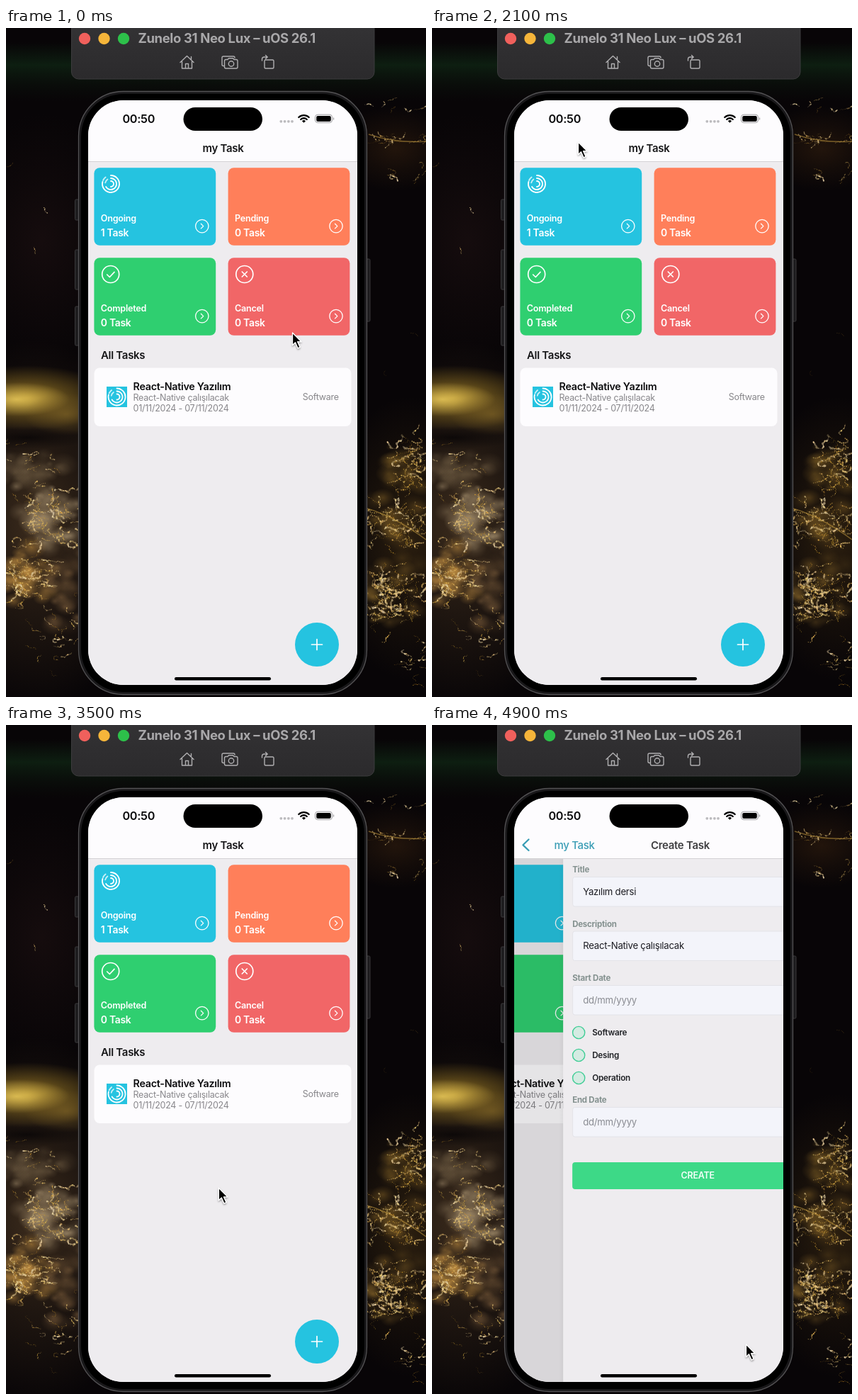
An HTML page with a canvas for the animation above (5 s loop, 593 by 944 pixels).

```html
<!DOCTYPE html>
<html lang="en">
<head>
<meta charset="utf-8">
<title>Task app demo</title>
<style>
html, body { margin: 0; width: 100%; height: 100%; overflow: hidden; background: #080507; }
canvas, svg { position: absolute; left: 0; top: 0; width: 593px; height: 944px; display: block; }
text { font-family: Inter, "Open Sans", sans-serif; letter-spacing: -.02em; white-space: pre; }
.line { fill: none; stroke-linecap: round; stroke-linejoin: round; }
.white { stroke: #fff; }
.nav { font-size: 15px; font-weight: 600; }
.name { font-size: 12.6px; font-weight: 600; fill: #fff; }
.count { font-size: 13.9px; font-weight: 600; fill: #fff; }
.sub { font-size: 12.5px; fill: #87868a; }
.label { font-size: 11.5px; font-weight: 700; fill: #84918f; }
.value { font-size: 13.2px; fill: #1c1c22; }
.hint { fill: #8a8c92; }
.option { font-size: 11.7px; font-weight: 600; fill: #202226; }
</style>
</head>
<body>
<canvas id="sky" width="593" height="944"></canvas>
<svg viewBox="0 0 593 944">
  <defs>
    <clipPath id="screen"><rect x="116" y="102" width="380" height="825" rx="50"/></clipPath>
    <linearGradient id="bar" x2="0" y2="1"><stop stop-color="#333234"/><stop offset="1" stop-color="#2b2a2c"/></linearGradient>
    <linearGradient id="edge"><stop stop-color="#000" stop-opacity="0"/><stop offset="1" stop-color="#000" stop-opacity=".04"/></linearGradient>
    <filter id="soft" x="-60%" y="-40%" width="240%" height="200%"><feDropShadow dx="0" dy="1.5" stdDeviation="1.3" flood-opacity=".4"/></filter>
    <g id="rings" class="line white">
      <path d="M0-12A12 12 0 1 1-11.6-3"/>
      <path d="M0-8A8 8 0 1 1-6.9 4"/>
      <path d="M0-4A4 4 0 0 1 0 4"/>
      <path d="M-11-5A12 12 0 0 1-7.4-9.5M-7.8-1.6A8 8 0 0 1-4.6-6.5" opacity=".75"/>
    </g>
    <g id="go" class="line white" stroke-width="1.3"><circle r="9.2"/><path d="M-1.5-3.3L1.9 0L-1.5 3.3"/></g>
  </defs>

  <!-- simulator toolbar -->
  <path d="M92.5 0V62a10 10 0 0 0 10 10H510a10 10 0 0 0 10-10V0Z" fill="url(#bar)" stroke="#3d3c3e"/>
  <circle cx="111" cy="15" r="8.2" fill="#f0605c"/>
  <circle cx="138.5" cy="15" r="8.2" fill="#f6b53a"/>
  <circle cx="166" cy="15" r="8.2" fill="#2dc04a"/>
  <text x="186.500" y="21" font-size="18.5" font-weight="700" fill="#a9a8aa">Zunelo 31 Neo Lux – uOS 26.1</text>
  <g class="line" stroke="#b0afb1" stroke-width="1.4">
    <path d="M246 48.5L255.5 39.5L265 48.5M248.5 47V57H262.5V47M253.5 57V50.5H257.5V57M261.5 44V40.5"/>
    <path d="M308 53.5H307a2 2 0 0 1-2-2V42a2 2 0 0 1 2-2H321a2 2 0 0 1 2 2"/>
    <path d="M310.5 44.5H313L314.5 42.8H320.5L322 44.5H325a2 2 0 0 1 2 2V55a2 2 0 0 1-2 2H310.5a2 2 0 0 1-2-2V46.5a2 2 0 0 1 2-2Z"/>
    <circle cx="318" cy="50.5" r="3.7"/>
    <rect x="365" y="45" width="13" height="12" rx="1.8"/>
    <path d="M361.5 46V44a3 3 0 0 1 3-3H369M366.5 38.5L369.2 41L366.5 43.5"/>
  </g>

  <!-- phone body -->
  <g fill="#1d1c1e" stroke="#3a393b">
    <rect x="97.5" y="242" width="6" height="29" rx="1.5"/>
    <rect x="97.5" y="313" width="6" height="56" rx="1.5"/>
    <rect x="97.5" y="393" width="6" height="55" rx="1.5"/>
    <rect x="508" y="326" width="6" height="88" rx="1.5"/>
  </g>
  <rect x="102.5" y="89.5" width="407" height="851" rx="63" fill="#19181a" stroke="#535254" stroke-width="1.3"/>
  <rect x="106" y="93" width="400" height="844" rx="60" fill="#000"/>

  <g clip-path="url(#screen)">
    <rect x="116" y="102" width="380" height="825" fill="#eeecef"/>
    <g id="home">
      <rect x="116" y="188" width="380" height="740" fill="#eeecef"/>
      <g id="cards"></g>
      <use href="#rings" x="148" y="220" stroke-width="1.9"/>
      <g class="line white" stroke-width="1.7">
        <circle cx="147.7" cy="347.5" r="12"/><path d="M142.7 348L146.3 351.5L153 344.3"/>
        <circle cx="336.8" cy="347.5" r="12"/><path d="M333.3 344L340.3 351M340.3 344L333.3 351"/>
      </g>
      <text x="134" y="466.5" font-size="15" font-weight="600" fill="#161618">All Tasks</text>
      <rect x="124.5" y="479.5" width="363" height="82.5" rx="8" fill="#fdfcfe"/>
      <rect x="142" y="506" width="29" height="29" fill="#25c3e0"/>
      <use href="#rings" x="156.5" y="520.5" stroke-width="1.8"/>
      <text x="179.5" y="510.8" font-size="14.35" font-weight="600" fill="#0c0c0e">React-Native Yazılım</text>
      <text class="sub" x="179.5" y="526.3">React-Native çalışılacak</text>
      <text class="sub" x="179.5" y="541.3">01/11/2024 - 07/11/2024</text>
      <text class="sub" x="469.8" y="525.3" text-anchor="end">Software</text>
      <g id="add">
        <circle cx="439" cy="870" r="31" fill="#25c3e0"/>
        <path class="line white" stroke-width="1.7" d="M431.5 870H446.5M439 862.5V877.5"/>
      </g>
    </g>
    <rect id="shade" x="116" y="188" width="380" height="740" opacity="0"/>
    <g id="form">
      <rect x="110" y="188" width="6" height="740" fill="url(#edge)"/>
      <rect x="116" y="188" width="380" height="740" fill="#eeecef"/>
      <g id="fields"></g>
      <rect x="129" y="617" width="354" height="38" rx="4" fill="#3dd987"/>
      <text x="306" y="640.3" text-anchor="middle" font-size="12.5" font-weight="600" fill="#f2fff8">CREATE</text>
    </g>

    <rect x="116" y="102" width="380" height="86" fill="#fdfcfe"/>
    <path d="M116 188.5H496" stroke="#d4d2d5"/>
    <text id="title" class="nav" x="277.5" y="174.5" fill="#161618">my Task</text>
    <g id="back" fill="#3a9db5">
      <path class="line" stroke="#3a9db5" stroke-width="2.3" d="M136.5 161.5L128.5 169.3L136.5 177"/>
      <text id="backText" class="nav" y="174.5" style="font-weight:500">my Task</text>
    </g>
    <text id="formTitle" class="nav" y="174.5" text-anchor="middle" fill="#161618">Create Task</text>

    <text x="164.5" y="134" font-size="16.2" font-weight="600" fill="#0a0a0c">00:50</text>
    <rect x="250.5" y="112" width="111.5" height="33" rx="16.5"/>
    <g fill="#bcbbbe"><circle cx="388.3" cy="131.8" r="1.9"/><circle cx="393.6" cy="131.8" r="1.9"/><circle cx="398.9" cy="131.8" r="1.9"/><circle cx="404" cy="131.8" r="1.9"/></g>
    <g class="line" stroke="#000" stroke-width="2.3" stroke-linecap="butt">
      <path d="M413.3 126A10.3 10.3 0 0 1 427.7 126M416.2 129A6.2 6.2 0 0 1 424.8 129"/>
    </g>
    <path d="M420.5 133.8L417.9 131.2A3.7 3.7 0 0 1 423.1 131.2Z"/>
    <rect x="436.5" y="122.2" width="24" height="11.4" rx="3.6" fill="none" stroke="#9c9b9e"/>
    <rect x="438.2" y="123.9" width="20.6" height="8" rx="2.2"/>
    <path d="M462 126V130a2.2 2.2 0 0 0 0-4Z" fill="#9c9b9e"/>
    <rect x="238" y="916" width="136" height="4.4" rx="2.2"/>
  </g>

  <path id="cursor" filter="url(#soft)" d="M0 0V17.5L4 13.8L7.5 21.8L10.6 20.4L7.1 12.7H12.5Z" stroke="#fff" stroke-width="1.3" stroke-linejoin="round"/>
</svg>
<script>
const $ = id => document.getElementById(id);

// night view of city lights
function drawSky() {
  const c = $('sky').getContext('2d');
  let seed = 29;
  const rnd = () => (seed = seed * 16807 % 2147483647) / 2147483647;
  const spread = () => (rnd() + rnd() + rnd()) / 1.5 - 1;
  const glow = (x, y, rx, ry, rgb, alpha) => {
    c.save();
    c.translate(x, y);
    c.scale(rx, ry);
    const g = c.createRadialGradient(0, 0, 0, 0, 0, 1);
    g.addColorStop(0, `rgba(${rgb},${alpha})`);
    g.addColorStop(.5, `rgba(${rgb},${alpha * .45})`);
    g.addColorStop(1, `rgba(${rgb},0)`);
    c.fillStyle = g;
    c.fillRect(-1, -1, 2, 2);
    c.restore();
  };
  const haze = (x, y, rx, ry, n, rgb) => {
    for (let i = 0; i < n; i++) {
      const r = 4 + rnd() * 13;
      glow(x + spread() * rx, y + spread() * ry, r * 1.3, r, rgb, .15 + rnd() * .4);
    }
  };
  // each string of lights wanders off from a random point
  const towns = (x, y, rx, ry, n, size) => {
    while (n--) {
      let px = x + spread() * rx, py = y + spread() * ry, turn = rnd() * 7;
      const bright = rnd();
      for (let k = 0; k < 9; k++) {
        const r = size * (.4 + rnd() * bright * 1.4);
        c.fillStyle = `hsla(${36 + rnd() * 9},${45 + rnd() * 30}%,${42 + bright * 35}%,${.25 + rnd() * .7})`;
        c.beginPath();
        c.ellipse(px, py, r, r * .75, turn, 0, 7);
        c.fill();
        turn += rnd() * 2 - 1;
        px += Math.cos(turn) * size * 2.2;
        py += Math.sin(turn) * size * 1.6;
      }
    }
  };
  c.fillStyle = '#080507';
  c.fillRect(0, 0, 593, 944);
  const air = c.createLinearGradient(0, 20, 0, 105);
  air.addColorStop(0, 'rgba(14,32,18,0)');
  air.addColorStop(.38, 'rgba(14,33,18,.9)');
  air.addColorStop(1, 'rgba(10,16,11,0)');
  c.fillStyle = air;
  c.fillRect(0, 20, 593, 85);

  glow(40, 700, 170, 260, '92,68,42', .6);
  glow(570, 720, 120, 200, '76,54,22', .5);
  glow(50, 300, 120, 180, '30,17,18', .6);
  glow(550, 170, 90, 60, '60,36,16', .5);
  glow(30, 522, 120, 46, '170,134,40', .9);
  glow(15, 524, 75, 24, '236,204,92', .8);
  glow(85, 545, 60, 30, '128,100,38', .7);
  glow(30, 578, 90, 16, '8,5,6', .8);

  haze(35, 625, 75, 45, 38, '104,86,62');
  haze(65, 690, 60, 60, 60, '168,146,112');
  haze(30, 770, 55, 45, 50, '196,144,66');
  haze(80, 790, 45, 80, 32, '112,84,54');
  haze(560, 620, 50, 50, 24, '118,88,34');
  haze(550, 700, 60, 55, 26, '124,92,36');
  haze(545, 800, 55, 70, 34, '128,96,40');

  towns(50, 300, 60, 190, 3, .7);
  towns(45, 600, 70, 45, 14, .9);
  towns(60, 690, 60, 70, 75, 1.2);
  towns(28, 772, 50, 50, 60, 1.2);
  towns(70, 850, 70, 80, 22, 1);
  towns(550, 110, 55, 22, 7, .8);
  towns(550, 158, 60, 9, 14, 1);
  towns(570, 210, 40, 18, 8, .9);
  towns(555, 410, 55, 150, 2, .7);
  towns(572, 615, 42, 55, 45, 1.3);
  towns(550, 700, 65, 55, 55, 1.3);
  towns(545, 800, 60, 70, 80, 1.4);
  towns(575, 885, 45, 55, 16, 1);
  c.lineWidth = 1.5;
  c.strokeStyle = 'rgba(222,176,72,.45)';
  c.stroke(new Path2D('M510 678Q550 690 593 722M512 150Q550 163 593 160'));
}

function buildCards() {
  const cards = [
    ['Ongoing', 1, '#25c3e0'], ['Pending', 0, '#ff7f5a'],
    ['Completed', 0, '#2fcf70'], ['Cancel', 0, '#f16667']
  ];
  $('cards').innerHTML = cards.map(([name, n, color], i) => {
    const x = i % 2 * 189.2, y = (i >> 1) * 127;
    return `<g transform="translate(${x} ${y})">
      <rect x="124.4" y="197.2" width="171.8" height="109.6" rx="8" fill="${color}"/>
      <text class="name" x="133.8" y="273">${name}</text>
      <text class="count" x="133.8" y="294.2">${n} Task</text>
      <use href="#go" x="276.8" y="279.6"/></g>`;
  }).join('');
}

function buildForm() {
  const field = (y, label, value, hint) => `
    <text class="label" x="129" y="${y - 6}">${label}</text>
    <rect x="129.5" y="${y + .5}" width="353" height="41.5" rx="3" fill="#f3f4fa" stroke="#e3e3e8"/>
    <text class="value ${hint ? 'hint' : ''}" x="144" y="${y + 25.8}">${value}</text>`;
  const option = (name, i) => `
    <circle cx="138" cy="${434 + i * 32}" r="8.6" fill="#d4ebe2" stroke="#40cd96" stroke-width="1.4"/>
    <text class="option" x="157" y="${438.2 + i * 32}">${name}</text>`;
  $('fields').innerHTML =
    field(214, 'Title', 'Yazılım dersi') +
    field(290.5, 'Description', 'React-Native çalışılacak') +
    field(367, 'Start Date', 'dd/mm/yyyy', true) +
    ['Software', 'Desing', 'Operation'].map(option).join('') +
    field(539, 'End Date', 'dd/mm/yyyy', true);
}

// pointer stops: time, x, y
const stops = [
  [0, 404.5, 430], [750, 206.5, 146], [1700, 206.5, 147], [2100, 206.5, 161],
  [3100, 221.5, 531], [4000, 410.5, 824], [4500, 443.5, 872], [4900, 443.5, 874]
];
const clamp = v => Math.min(1, Math.max(0, v));
const mix = (a, b, k) => a + (b - a) * k;
const ease = k => k * k * (3 - 2 * k);

function pointer(t) {
  let i = 0;
  while (i < stops.length - 2 && t >= stops[i + 1][0]) i++;
  const [a, b] = [stops[i], stops[i + 1]];
  const k = ease(clamp((t - a[0]) / (b[0] - a[0])));
  return [mix(a[1], b[1], k), mix(a[2], b[2], k)];
}

const set = (id, name, value) => $(id).setAttribute(name, value);

function render(t) {
  set('cursor', 'transform', `translate(${pointer(t)})`);
  set('add', 'opacity', t < 4700 ? 1 : t < 4800 ? .25 : .6);

  const p = clamp((t - 4720) / 180) * .818;
  set('home', 'transform', `translate(${-114 * p} 0)`);
  set('shade', 'opacity', .115 * p);
  set('form', 'transform', `translate(${380 * (1 - p)} 0)`);
  set('form', 'visibility', p ? 'visible' : 'hidden');

  const x = mix(277.5, 149, p);
  set('title', 'x', x);
  set('backText', 'x', x);
  set('title', 'opacity', clamp(1 - p * 1.3));
  set('back', 'opacity', clamp(p * 1.25));
  set('formTitle', 'x', 306 + 244 * (1 - p));
  set('formTitle', 'opacity', p);
}

drawSky();
buildCards();
buildForm();
const start = performance.now();
function tick() {
  const t = (performance.now() - start) % 5000;
  render(Math.floor(t / 100) * 100);
  requestAnimationFrame(tick);
}
tick();
</script>
</body>
</html>
```
